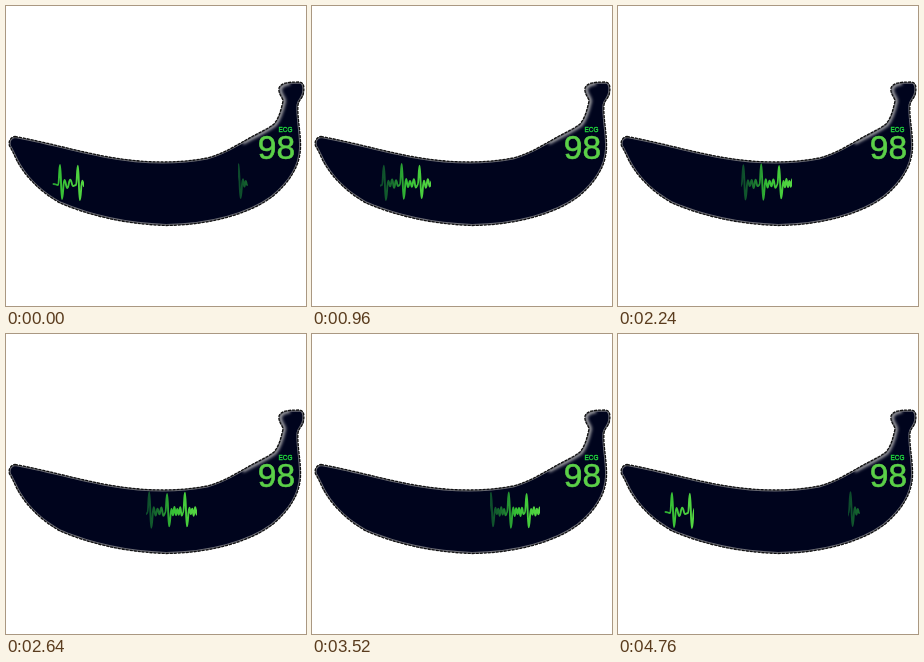
Animation, 300 px wide and 300 px high, one loop 4.8 s. Source, as an HTML page:

```html
<!DOCTYPE html>
<html lang="en">
<head>
<meta charset="utf-8">
<title>Banana ECG</title>
<style>
  html, body { margin: 0; height: 100%; overflow: hidden; background: #fff; }
  svg { display: block; width: 100vw; height: 100vh; }
  text { font-family: "Liberation Sans", Arial, sans-serif; }
</style>
</head>
<body>
<svg viewBox="0 0 300 300">
  <defs>
    <path id="banana" d="M9 130.500 C40 136 70 145 100 150.500 C135 157 170 158 201 152
      C217 148 229 140 240 134 C252 127 262 123 268 118 C273 112 275 104 277 95
      C277 92 272 88 273 82 C275 77 281 76 294 76 C298 77 298.500 81 297.500 87
      C297 92 292.500 94 292 99 C291 112 295 126 294.500 142 C294 160 283 177 266 191
      C243 208 204 219 160 219.500 C117 218 82 209 54 197 C36 187 22 173 14 160
      C9 152 8 147 3.500 140 C2 135 5 131 9 130.500Z"/>
    <clipPath id="inside"><use href="#banana"/></clipPath>
    <filter id="soft"><feGaussianBlur stdDeviation="1.500"/></filter>
    <linearGradient id="sweep" gradientUnits="userSpaceOnUse" spreadMethod="repeat" y1="0" y2="0">
      <stop offset=".752" stop-color="#1a9a3c" stop-opacity="0"/>
      <stop offset=".752" stop-color="#1a9a3c" stop-opacity=".45"/>
      <stop offset=".81" stop-color="#25a637" stop-opacity=".65"/>
      <stop offset=".88" stop-color="#35bf35"/>
      <stop offset="1" stop-color="#55d842"/>
    </linearGradient>
  </defs>
  <use href="#banana" fill="#00041d"/>
  <g clip-path="url(#inside)" fill="none">
    <path d="M236 136 C252 127 262 123 268 118 C273 112 275 104 277 95 C277 92 272 88 273 82 Q275 77 284 76"
      stroke="#a0a0a4" stroke-width="6" filter="url(#soft)"/>
    <use href="#banana" stroke="#6d6e76" stroke-width="3"/>
  </g>
  <use href="#banana" fill="none" stroke="#111" stroke-width="1.300" stroke-dasharray="3 1"/>
  <text x="272.500" y="125.700" font-size="6.400" fill="#1fd03c" stroke="#1fd03c" stroke-width=".4">ECG</text>
  <text x="251.800" y="153" font-size="33.500" fill="#5bd048" stroke="#5bd048" stroke-width=".6">98</text>
  <path id="trace" fill="none" stroke="url(#sweep)" stroke-width="1.900" stroke-linecap="round"/>
</svg>
<script>
  const LOOP = 4800, TRACK = 205, HEAD_START = 78;
  const FIRST_BEAT = 54, BEAT = 17.85, BEATS = 11, END = 241;
  const sweep = document.getElementById('sweep');

  // Each beat is a tall spike followed by ripples, which get denser along the track.
  function beatPoints(k) {
    const x = FIRST_BEAT + k * BEAT;
    const points = [[x - 1.8, 179], [x, 159 + Math.sin(k * 2.3)], [x + 2, 193 + Math.sin(k * 1.7)]];
    const turns = 2 * Math.round(2.4 + k / 5);
    for (let i = 0; i < turns; i++) {
      const y = (i % 2 ? 181 : 174) + Math.sin(k * 2.3 + i * 1.7);
      points.push([x + 4.4 + i * (BEAT - 6.2) / turns, y]);
    }
    return points;
  }

  function tracePath() {
    const points = [[47.5, 178]];
    for (let k = 0; k < BEATS; k++) points.push(...beatPoints(k).filter(([x]) => x < END));
    points.push([END, 179]);
    return points.map(([x, y], i) => {
      if (!i) return `M${x} ${y}`;
      const [px, py] = points[i - 1], mid = (px + x) / 2;
      return `C${mid} ${py} ${mid} ${y} ${x} ${y}`;
    }).join('');
  }

  function draw(now) {
    const head = HEAD_START + TRACK * (now % LOOP) / LOOP;
    sweep.setAttribute('x1', head - TRACK);
    sweep.setAttribute('x2', head);
    requestAnimationFrame(draw);
  }

  document.getElementById('trace').setAttribute('d', tracePath());
  draw(performance.now());
</script>
</body>
</html>
```
